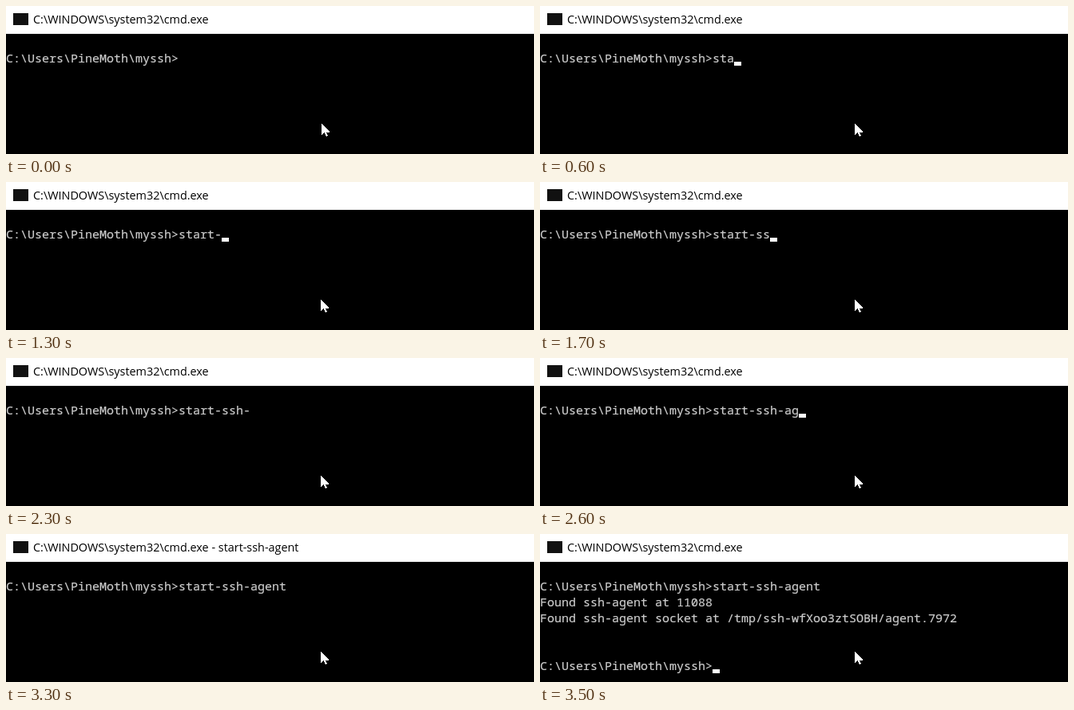
Write an HTML page that moves like this. It is 661 px wide and 186 px high and loops after 4400 ms.

```html
<!DOCTYPE html>
<html lang="en">
<head>
<meta charset="utf-8">
<title>Console</title>
<style>
  html, body { margin: 0; width: 661px; height: 186px; overflow: hidden; background: #000; }
  svg { display: block; }
  text { white-space: pre; }
  #title { font: 14.4px "Open Sans", "Noto Sans", sans-serif; }
  #lines { font: 15px "Noto Sans Mono", "DejaVu Sans Mono", monospace; fill: #ccc; stroke: #ccc; stroke-width: .2; }
</style>
</head>
<body>
<svg width="661" height="186">
  <rect width="661" height="35" fill="#fff"/>
  <rect x="9" y="9" width="19" height="15" fill="#111"/>
  <text id="title" x="34" y="22"></text>
  <g id="lines"></g>
  <rect id="caret" width="9" height="5" fill="#fff"/>
  <path id="mouse" d="M0 0V15L3.5 11.7L6 16.5L8 15.6L5.8 11H10.5Z" fill="#fff" shape-rendering="crispEdges"/>
</svg>
<script>
const LOOP = 4400, TICK = 100, KEY = 75, RUN = 3200, DONE = 3500;
const CHAR = 9, LINE = 20, TOP = 71;
const PATH = "C:\\WINDOWS\\system32\\cmd.exe";
const PROMPT = "C:\\Users\\PineMoth\\myssh>";
const COMMAND = "start-ssh-agent";
const OUTPUT = [
  "Found ssh-agent at 11088",
  "Found ssh-agent socket at /tmp/ssh-wfXoo3ztSOBH/agent.7972",
  "", "", PROMPT
];

// Bursts of keys by start time; inside a burst one key follows every KEY ms.
const bursts = { 300: "s", 525: "tart", 1300: "-", 1500: "s", 1700: "sh", 2300: "-a", 2600: "gent" };
const blinks = [300, 800, 1300, 1900, 2400, 3300, DONE];

const typedAt = t => Object.entries(bursts)
  .map(([from, keys]) => keys.slice(0, Math.max(0, Math.floor((t - from) / KEY) + 1)))
  .join("");
const caretAt = t => blinks.filter(time => time <= t).length % 2;

const el = id => document.getElementById(id);
const title = el("title"), caret = el("caret"), mouse = el("mouse");
const rows = [PROMPT, ...OUTPUT].map((_, i) => {
  const row = document.createElementNS("http://www.w3.org/2000/svg", "text");
  row.setAttribute("y", TOP + i * LINE);
  return el("lines").appendChild(row);
});

function draw(t) {
  const lines = [PROMPT + typedAt(t)];
  if (t >= DONE) lines.push(...OUTPUT);
  else if (t >= RUN) lines.push("");

  rows.forEach((row, i) => row.textContent = lines[i] || "");
  title.textContent = PATH + (t >= RUN && t < DONE ? " - " + COMMAND : "");

  const last = lines.length - 1;
  caret.setAttribute("x", lines[last].length * CHAR);
  caret.setAttribute("y", TOP - 1 + last * LINE);
  caret.setAttribute("opacity", caretAt(t));
  mouse.setAttribute("transform", `translate(${t < 400 ? 395 : 394} 147.5)`);
}

const start = performance.now();
function tick() {
  const t = (performance.now() - start) % LOOP;
  draw(Math.floor(t / TICK) * TICK);
  requestAnimationFrame(tick);
}
tick();
</script>
</body>
</html>
```
